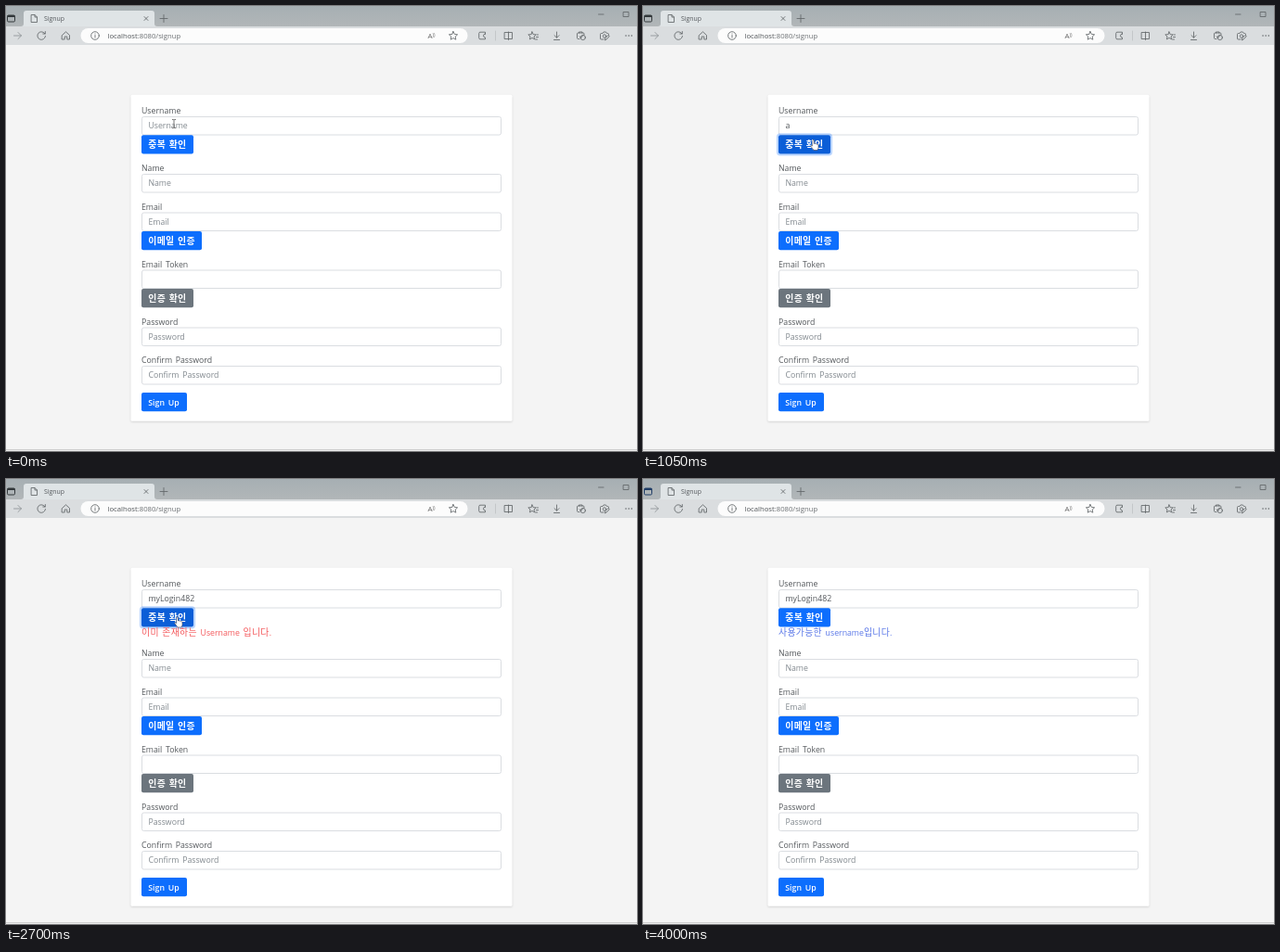
An HTML page that plays this animation: 680 by 480 pixels, repeating every 4.05 s.

```html
<!DOCTYPE html>
<html lang="ko">
<head>
<meta charset="utf-8">
<title>Signup</title>
<style>
  html, body { margin: 0; width: 100%; height: 100%; overflow: hidden; background: #f4f4f4; }
  svg { display: block; width: 680px; height: 480px; }
  text { font: 8.75px "Open Sans", "Noto Sans", sans-serif; word-spacing: 1.4px; fill: #54585c; white-space: pre; }
  .ko { font: 9.9px "Noto Sans CJK KR", "Noto Sans CJK", sans-serif; letter-spacing: .3px; word-spacing: .5px; }
  .btn { fill: #fff; font-weight: 600; }
  .btn.ko { font-weight: 700; }
  .hint { fill: #82898f; }
  .icon { fill: none; stroke: #63676a; stroke-width: .85; stroke-linecap: round; stroke-linejoin: round; }
  .card { filter: drop-shadow(0 1px 1.2px #0002); }
</style>
</head>
<body>
<svg viewBox="0 0 680 480" xmlns="http://www.w3.org/2000/svg">
  <defs>
    <linearGradient id="strip" x2="0" y2="1">
      <stop stop-color="#a6afb3"/><stop offset="1" stop-color="#b1b6b8"/>
    </linearGradient>
  </defs>
  <rect width="680" height="480" fill="#f4f4f4"/>
  <rect width="680" height="22" fill="url(#strip)"/>
  <rect y="22" width="680" height="20" fill="#dadddf"/>
  <path d="M16 22q3 0 3-3V8q0-3 3-3h135q3 0 3 3v11q0 3 3 3z" fill="#dfe4e6"/>
  <rect x="80.500" y="24" width="417" height="16" rx="8" fill="#fcfcfc"/>
  <rect y="478" width="680" height="1.200" fill="#cfcfcf"/>

  <g id="space">
    <rect x="1.500" y="10" width="8" height="7" rx="1.200" fill="none" stroke="currentColor"/>
    <path d="M1.500 11h8" stroke="currentColor" stroke-width="2"/>
  </g>
  <text x="41" y="15.600" style="font-size:6.9px">Signup</text>
  <text x="109.500" y="34.800" style="font-size:7.7px">localhost<tspan fill="#6c7073">:8080/signup</tspan></text>
  <text x="454.500" y="35" style="font-size:8px;fill:#666">A<tspan dy="-2" style="font-size:5px">))</tspan></text>

  <g class="icon">
    <path d="M27.500 9.500h3.500l2.500 2.500v5.500h-6zM31 9.500V12h2.500"/>
    <path d="M149 11.500l4 4m0-4l-4 4M170 9.500v8m-4-4h8M638.500 9h5.500M665.500 6.500h5.500v5h-5.500z"/>
    <path d="M8.500 32h8m-3.500-3.500l3.500 3.500-3.500 3.500" stroke="#8d9295"/>
    <path d="M42 30a4.300 4.300 0 1 0 .5 2.500M42.300 27.500V30h-2.500"/>
    <path d="M60.500 31.500l4-3.700 4 3.700v4.500h-2.700v-3h-2.600v3h-2.700z"/>
    <circle cx="96" cy="32" r="4.300"/><path d="M96 31.500v2.500M96 29.900v.1"/>
    <g id="stars"></g>
    <path d="M516.500 30v-1.800h-5.500a1.300 1.300 0 0 0-1.300 1.300v5a1.300 1.300 0 0 0 1.300 1.300h5.500V34a2 2 0 1 1 0-4z"/>
    <path d="M527.500 27v10" stroke="#bfc3c5"/>
    <path d="M537.500 28.500h8v7h-8zM541.500 28v8.500M593.500 28v6m-2.500-2.300l2.500 2.500 2.500-2.500M590.500 36.500h6"/>
    <path d="M572 31h1.500M571.500 33.500h2M570.500 36h2"/>
    <path d="M618 35.500h-1.500q-1 0-1-1V30q0-1 1-1h5.500q1 0 1 1v1M617.500 29v-1h3.500v1M618 33l1.500 1.500 2.500-3"/><circle cx="621.800" cy="34" r="2.600"/>
    <path d="M644 36h-2.500q-1 0-1-1v-4.500q0-1 1-1h1.500l1-1.500h2.500l1 1.500h1q1 0 1 1v1M645.500 36.500l.5-2 3-3 1.300 1.300-3 3z"/><circle cx="645" cy="32.500" r="1.700"/>
    <path d="M668 32h.1m3 0h.1m3 0h.1" stroke-width="1.500"/>
  </g>

  <rect id="card" class="card" x="134.500" y="95.700" width="411" height="352" rx="1.500" fill="#fff"/>
  <g id="top"></g>
  <g id="rest"></g>
  <text id="note" x="146" y="169.300"></text>
  <g id="beam" fill="none">
    <path d="M-2-4.500h1.500l.5.500.500-.5H2M0-4v8M-2 4.500h1.500l.5-.5.500.5H2" stroke="#666" stroke-width=".9"/>
  </g>
  <path id="hand" d="M-2-5.500q1.200-.6 1.500.5V-1.500q1-.6 1.500.3 1-.5 1.500.4 1.300-.3 1.500.8V3L3 5.500H-1L-4.300 1q.3-1.300 1.800 0z"
    fill="#fff" stroke="#445" stroke-width=".6" stroke-linejoin="round"/>
</svg>
<script>
const $ = id => document.getElementById(id);
const LOOP = 4050, STEP = 50, GROW = 13;
const NAME = "myLogin482";
const BLUE = "#0d6efd", LINE = "#d6dade";

const label = (y, s) => `<text x="146" y="${y}">${s}</text>`;
const input = (y, hint, id = "") =>
  `<rect ${id && `id="${id}Box"`} x="146.500" y="${y + .5}" width="387" height="19.500" rx="2" fill="#fff" stroke="${LINE}" stroke-width=".9"/>
   <text ${id && `id="${id}"`} class="hint" x="153.400" y="${y + 13.4}">${hint}</text>`;
const button = (y, w, s, cls = "ko", fill = BLUE, id = "") =>
  `<rect ${id && `id="${id}"`} x="146" y="${y}" width="${w}" height="20.200" rx="2" fill="${fill}"/>
   <text class="btn ${cls}" x="153.300" y="${y + 13.6}">${s}</text>`;
const ring = (id, y, w, h) =>
  `<rect id="${id}" x="145" y="${y - 1}" width="${w + 2}" height="${h + 2}" rx="3" fill="none" stroke="${BLUE}" stroke-opacity=".28" stroke-width="2.200"/>`;

$("top").innerHTML = label(116, "Username") + input(119, "Username", "user")
  + button(139.3, 56, "중복 확인", "ko", BLUE, "check")
  + ring("userRing", 119, 388, 20.5) + ring("checkRing", 139.3, 56, 20.2)
  + `<path id="caret" d="M154 124v10" stroke="#222" stroke-width=".8"/>`;

$("rest").innerHTML = label(178, "Name") + input(181, "Name")
  + label(219.5, "Email") + input(222.5, "Email") + button(243, 65, "이메일 인증")
  + label(281.7, "Email Token") + input(284.5, "") + button(305, 56, "인증 확인", "ko", "#6c757d")
  + label(343.5, "Password") + input(346.5, "Password")
  + label(385, "Confirm Password") + input(388, "Confirm Password")
  + button(417, 49, "Sign Up", "");

function star(x, r) {
  const pts = Array.from({ length: 10 }, (_, i) => {
    const a = i * Math.PI / 5, d = i % 2 ? r * .48 : r;
    return [x + d * Math.sin(a), 32.3 - d * Math.cos(a)].map(v => v.toFixed(1));
  });
  return `<polygon points="${pts.join(" ")}"/>`;
}
$("stars").innerHTML = star(482, 4.8) + star(567, 4.4);

const ko = s => `<tspan class="ko">${s}</tspan>`;
const TAKEN = ko("이미 존재하는") + " Username " + ko("입니다") + ".";
const FREE = ko("사용가능한") + " username" + ko("입니다") + ".";

// Pointer stops: time, x, y
const PATH = [
  [0, 181, 127], [50, 181, 127], [250, 206, 128], [550, 206, 128], [800, 185, 150], [1150, 185, 150],
  [1400, 194, 127], [2100, 194, 127], [2400, 186, 154.5], [LOOP, 186, 154.5]
];
function pointer(t) {
  const i = PATH.findIndex(p => p[0] > t), [t0, x0, y0] = PATH[i - 1], [t1, x1, y1] = PATH[i];
  const k = (t - t0) / (t1 - t0), e = k * k * (3 - 2 * k);
  return [x0 + (x1 - x0) * e, y0 + (y1 - y0) * e];
}

const within = (t, a, b) => t >= a && t < b;
const show = (id, on) => $(id).setAttribute("visibility", on ? "visible" : "hidden");

function typed(t) {
  if (t < 500) return "";
  if (t < 1700) return "a";
  return NAME.slice(0, (t - 1700) / STEP);
}

function draw(t) {
  const value = typed(t), [x, y] = pointer(t);
  const inField = within(t, 300, 800) || within(t, 1600, 2500);
  const onButton = within(t, 800, 1600) || within(t, 2500, 3950);
  const onPage = t < 3900, hover = onPage && y > 139;
  const pressed = within(t, 800, 950) || within(t, 2500, 2650);
  const tall = t >= 1100, free = t >= 2900;

  $("user").textContent = value || "Username";
  $("user").setAttribute("class", value ? "" : "hint");
  $("userBox").setAttribute("stroke", inField ? "#86b7fe" : LINE);
  $("check").setAttribute("fill", pressed ? "#0a53be" : hover || onButton ? "#0b5ed7" : BLUE);
  show("userRing", inField);
  show("checkRing", onButton);
  show("caret", inField && !value);

  $("card").setAttribute("height", 352 + (tall ? GROW : 0));
  $("rest").setAttribute("transform", `translate(0 ${tall ? GROW : 0})`);
  show("note", tall);
  $("note").innerHTML = free ? FREE : TAKEN;
  $("note").style.fill = free ? "#5b78e8" : "#f4595c";

  for (const id of ["beam", "hand"]) $(id).setAttribute("transform", `translate(${x} ${y})`);
  show("beam", onPage && !hover);
  show("hand", hover);
  $("space").setAttribute("color", onPage ? "#33383b" : "#1f3c66");
}

function tick() {
  draw(Math.floor(performance.now() % LOOP / STEP) * STEP);
  requestAnimationFrame(tick);
}
tick();
</script>
</body>
</html>
```
